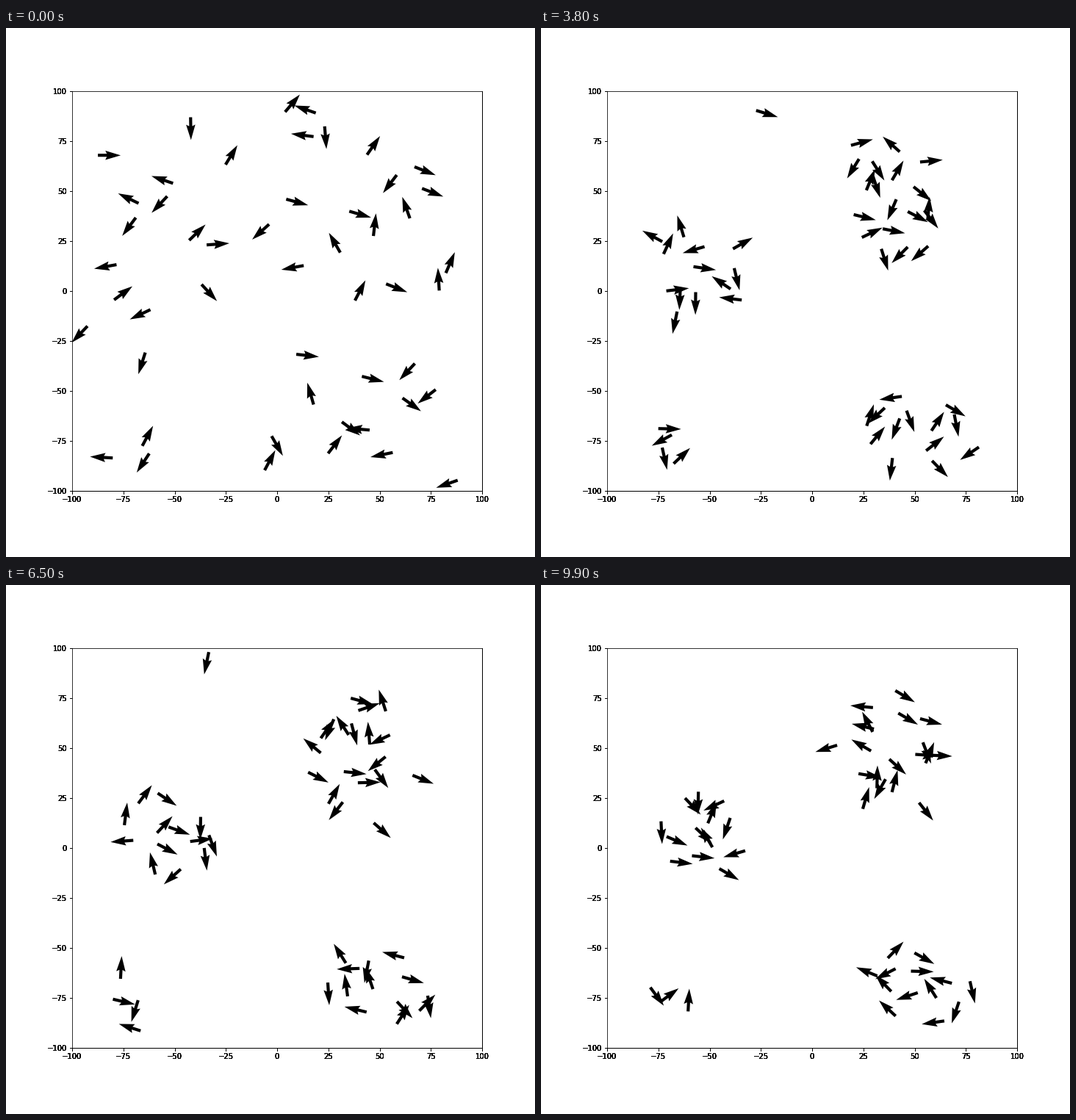
A matplotlib script for the animation above (10000 ms loop, 720x720 px).

```python
import numpy as np
import matplotlib.pyplot as plt
from matplotlib.animation import FuncAnimation

FRAMES = 100
STEP = 1.8     # length of one random step
PULL = 0.045   # share of the way home covered per frame
PUSH = 1.9     # repulsion at unit distance
RADIUS = 4.0   # repulsion stops growing below this distance

# size, home, start box (x0, x1, y0, y1), width/height squeeze, vertical drift
SWARMS = [
    (13, (-55, 8), (-96, -24, -20, 75), 0.86, 0),
    (19, (38, 48), (-5, 84, -10, 95), 1.17, 0),
    (13, (50, -70), (-11, 90, -96, -31), 0.94, 0),
    (3, (-74, -73), (-89, -54, -84, -77), 1, 0),
    (1, (-70, -93), (-70, -64, -32, -26), 1, -0.1),
    (1, (-31, 95), (-44, -40, 87, 90), 1, 0.1),
]


def repulsion(pos):
    """Push falling off as 1/distance, which fills a disc evenly."""
    gap = pos[:, None] - pos[None]
    dist2 = np.maximum((gap ** 2).sum(axis=2), RADIUS ** 2)
    return PUSH * (gap / dist2[..., None]).sum(axis=1)


def scatter(rng, size, box):
    """Random start, one agent per vertical and horizontal slice of the box."""
    x0, x1, y0, y1 = box
    u = (np.arange(size) + rng.random(size)) / size
    v = (rng.permutation(size) + rng.random(size)) / size
    return np.column_stack([x0 + u * (x1 - x0), y0 + v * (y1 - y0)])


def simulate(rng, size, home, box, squeeze, drift):
    """Positions and headings of one swarm, one row per frame."""
    home = np.array(home, float)
    stiffness = PULL * np.array([squeeze, 1 / squeeze])
    headings = rng.uniform(-np.pi, np.pi, (FRAMES, size))
    pos = scatter(rng, size, box)
    track = []
    for heading in headings:
        track.append(pos)
        walk = STEP * np.column_stack([np.cos(heading), np.sin(heading)])
        pos = pos + walk + stiffness * (home - pos) + repulsion(pos)
        home[1] += drift
    return np.array(track), headings


rng = np.random.default_rng(11)
tracks, turns = zip(*(simulate(rng, *swarm) for swarm in SWARMS))
POS = np.concatenate(tracks, axis=1)
HEADING = np.concatenate(turns, axis=1)

fig = plt.figure(figsize=(10, 10), dpi=72, facecolor="white")
# stacked axes darken the tick labels
for layer in range(6):
    ax = fig.add_axes([0.125, 0.125, 0.775, 0.755], label=f"layer{layer}")
    ax.set(xlim=(-100, 100), ylim=(-100, 100))

arrows = ax.quiver(*POS[0].T, np.cos(HEADING[0]), np.sin(HEADING[0]),
                   scale=18, width=0.0075, color="black")


def update(i):
    arrows.set_offsets(POS[i])
    arrows.set_UVC(np.cos(HEADING[i]), np.sin(HEADING[i]))
    return arrows,


anim = FuncAnimation(fig, update, frames=FRAMES, interval=100, repeat=True)
plt.show()
```
